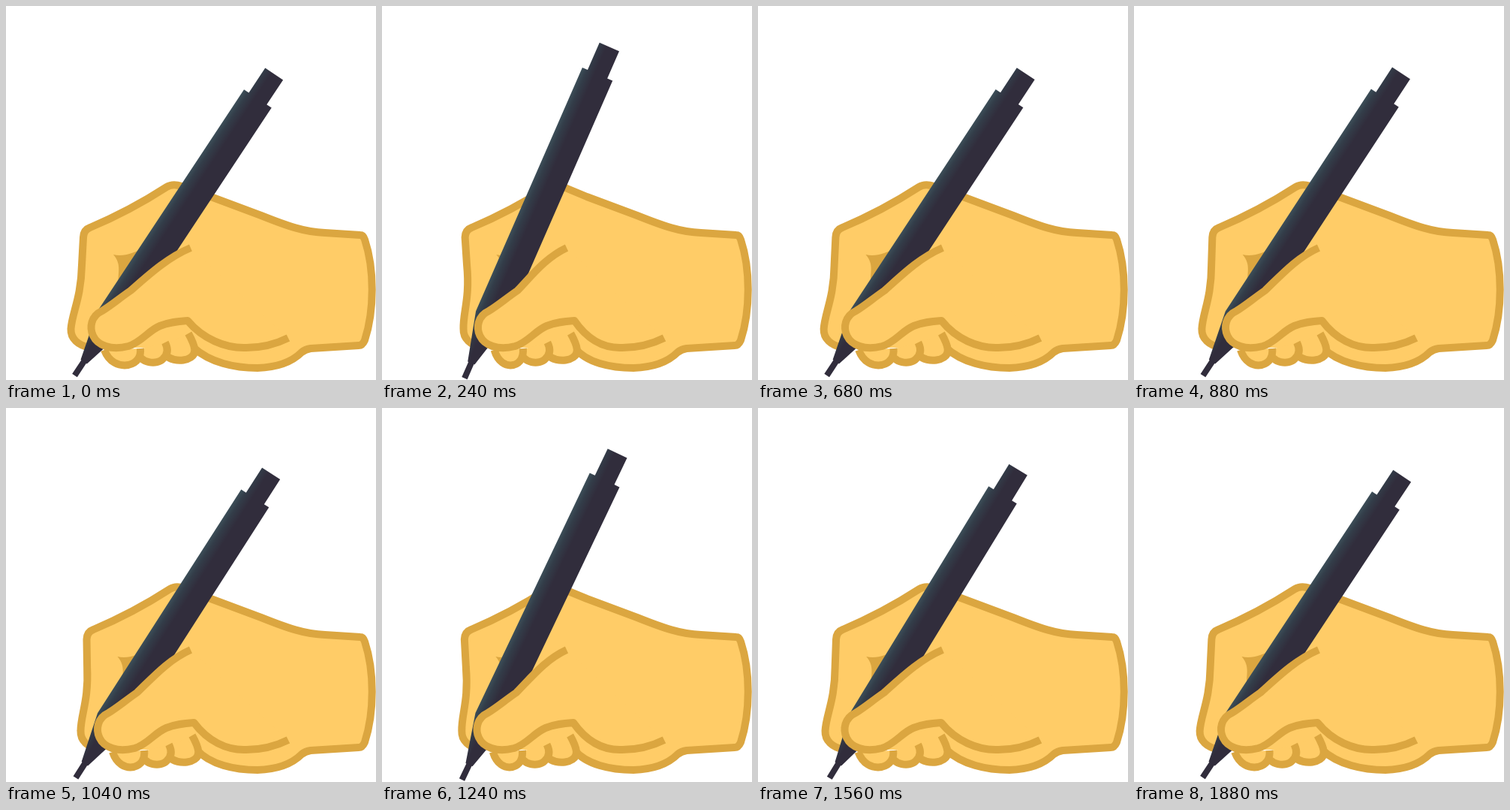
An HTML page for the animation above (1.92 s loop, 493 by 498 pixels).

```html
<!DOCTYPE html>
<html lang="en">
<head>
<meta charset="utf-8">
<title>Writing hand</title>
<style>
  html, body { margin: 0; width: 100%; height: 100%; overflow: hidden; background: #fff; }
  svg { display: block; width: 493px; height: 498px; }
  .skin { fill: #ffcc67; stroke: #dba640; stroke-width: 10; stroke-linejoin: round; }
</style>
</head>
<body>
<svg viewBox="0 0 493 498">
  <defs>
    <linearGradient id="sheen" gradientUnits="userSpaceOnUse" x1="-22" y1="0" x2="22" y2="0">
      <stop offset="0" stop-color="#3c4e58"/>
      <stop offset=".16" stop-color="#333d49"/>
      <stop offset=".42" stop-color="#312d3c"/>
    </linearGradient>
  </defs>
  <path id="palm" class="skin" d="M112 455C96 452 86 443 86.5 430C88 408 100 390 101 345
    L103 308Q103.5 298 112 295C150 279 180 263 214 241Q222 236 234 240L273 254L340 279
    C375 293 398 301 425 302L472 305Q476 305 478 311C491 350 491 405 478 445Q475 452 470 452
    L406 456Q399 457 394 461C382 473 365 481 335 482C305 482 272 475 250 455"/>
  <path id="shade" fill="#dba640" d="M143 331C157 334 170 329 184 322L150 372C148 355 155 345 143 331Z"/>
  <path id="pen" fill="url(#sheen)"
    d="M-4 0V-22H-5L-22 -88V-442H-14.3V-481.5H14.3V-442H22V-88L5 -22H4V0Z"/>
  <path class="finger skin" d="M207 452C210 474 236 475 246 468C254 463 253 454 243 436"/>
  <path class="finger skin" d="M174 458C178 477 202 478 209 470C216 464 216 456 212 448"/>
  <path class="finger skin" d="M131 458C137 474 150 480 163 478C176 475 180 466 179 456"/>
  <path id="thumb" class="skin" d="M246 322C215 335 190 358 166 379C150 390 141 398 128 406
    C113 413 111 428 116 439C122 452 140 459 163 453C180 448 190 432 205 426
    C218 421 228 420 242 419C262 443 292 456 320 455C342 455 358 451 376 442"/>
</svg>
<script>
const LOOP = 960, STEP = 40;
const find = selector => document.querySelector(selector);
const clamp = v => Math.min(1, Math.max(0, v));
const mix = (a, b, k) => a + (b - a) * k;
const ease = k => (1 - Math.cos(Math.PI * clamp(k))) / 2;

// two joined strokes, then a short one; the pen trails the hand
const strokes = last => [[0, 0], [160, 1], [300, .75], [460, 1], [640, 0], [800, last], [960, 0]];
const thumbPull = strokes(1);
const handPull = strokes(.3);
const penSwing = [[60, 0], [180, 1.08], [315, .68], [470, 1.05], [650, 0], [800, .09], [920, 0]];

function valueAt(track, t) {
  let value = track[0][1];
  for (let i = 1; i < track.length; i++) {
    const [t0, v0] = track[i - 1], [t1, v1] = track[i];
    value += (v1 - v0) * ease((t - t0) / (t1 - t0));
  }
  return value;
}

// how far each point moves right at full pull
const palmShift = (x, y) => (9 + 17 * clamp((y - 308) / 120)) * clamp((262 - x) / 40);
const fingerShift = x => mix(22, 10, clamp((x - 131) / 50));
const thumbShift = (x, y) => 17 * clamp((y - 325) / 45) * clamp((300 - x) / 50);

function bendable(path, shift) {
  const rest = path.getAttribute("d");
  return pull => path.setAttribute("d", rest.replace(/([\d.]+) ([\d.]+)/g,
    (_, x, y) => `${(+x + pull * shift(+x, +y)).toFixed(2)} ${y}`));
}

const bendPalm = bendable(find("#palm"), palmShift);
const bendThumb = bendable(find("#thumb"), thumbShift);
const bendFingers = [...document.querySelectorAll(".finger")].map(f => bendable(f, fingerShift));

function draw(t) {
  const hand = valueAt(handPull, t);
  const thumb = valueAt(thumbPull, t);
  const pen = valueAt(penSwing, t);
  bendPalm(hand);
  bendThumb(thumb);
  bendFingers.forEach(bend => bend(thumb));
  find("#shade").setAttribute("transform", `translate(${11 * hand} 0)`);
  find("#pen").setAttribute("transform",
    `translate(${mix(91.5, 111.7, pen)} ${mix(492, 496, pen)}) rotate(${mix(33.5, 22.7, pen)})`);
}

const start = performance.now();
function tick() {
  const t = performance.now() - start;
  draw(Math.floor(t / STEP) * STEP % LOOP);
  requestAnimationFrame(tick);
}
tick();
</script>
</body>
</html>
```
